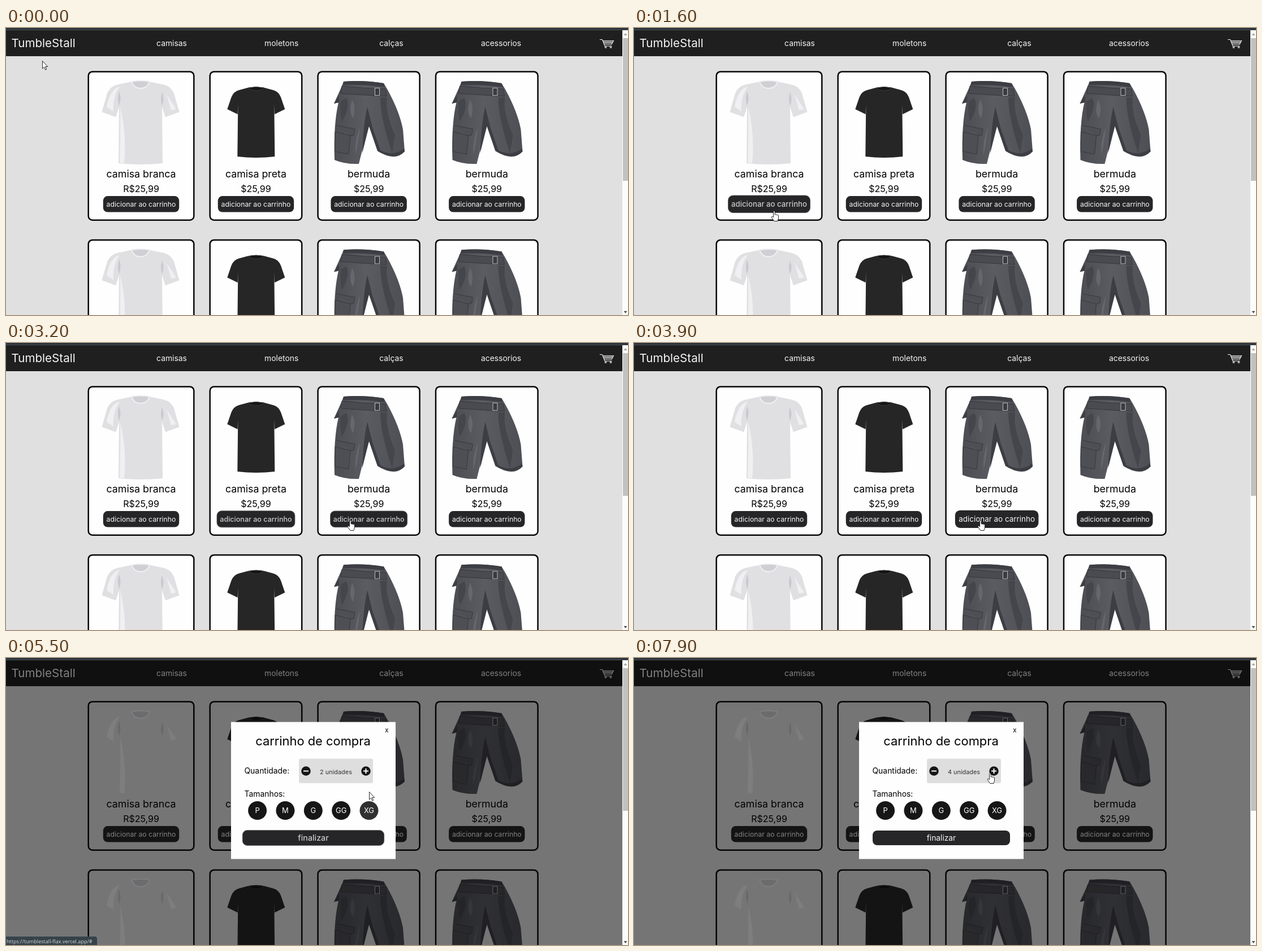
Animation, 1100 px wide and 509 px high, one loop 8 s. Source, as an HTML page:

```html
<!DOCTYPE html>
<html lang="pt">
<head>
<meta charset="utf-8">
<title>TumbleStall</title>
<style>
html, body { margin: 0; width: 100%; height: 100%; overflow: hidden; background: #e0e0e0; }
svg { display: block; width: 1100px; height: 509px; }
text { font-family: Inter, "Noto Sans", sans-serif; font-size: 13.9px; }
.mid { text-anchor: middle; }
.nav text { fill: #f4f4f4; }
.card { fill: #fefefe; stroke: #060606; stroke-width: 2.5; }
.dim .card { fill: #e0e0e0; }
.name { font-size: 17.8px; }
.price { font-size: 16px; }
.btn rect { fill: #262628; }
.btn text { font-size: 12.25px; fill: #f6f6f6; text-anchor: middle; }
.btn.busy rect { stroke: #5a5a5e; stroke-width: .8; }
.btn.busy text { fill: #c9c9c9; font-weight: 500; }
.btn.wide text { font-size: 13.8px; }
.sizes text { font-size: 13px; fill: #fff; text-anchor: middle; }
.link text { font-family: "Open Sans", "Noto Sans", sans-serif; font-size: 9.1px; fill: #d5dadd; }
</style>
</head>
<body>
<svg viewBox="0 0 1100 509">
  <defs>
    <linearGradient id="denim">
      <stop offset="0" stop-color="#4c4d53"/><stop offset=".45" stop-color="#5b5c62"/>
      <stop offset="1" stop-color="#4e4f55"/>
    </linearGradient>
    <g id="white">
      <path id="whiteCloth" fill="#e0e0e2"/>
      <path fill="#f0f0f3" d="M201 104Q184 108 178 140L190 148Q188 122 201 104ZM202 140Q214 190 209 240L201 239Q203 180 202 140ZM284 118l8 28 9-2Z"/>
      <path fill="#c9c9d0" d="M200 138Q205 124 200 112Q196 126 200 138ZM276 138Q272 126 276 114Q281 126 276 138Z"/>
      <path fill="#cfcfd4" stroke="#f0f0f2" stroke-width="2" d="M222 95Q238 92 254 95Q250 107 238 107Q226 107 222 95Z"/>
    </g>
    <g id="black">
      <path id="blackCloth" fill="#262626"/>
      <path fill="#151515" stroke="#3a3a3a" d="M429 106Q442 103 456 106Q451 111 442 111Q434 111 429 106Z"/>
    </g>
    <g id="shorts">
      <path fill="url(#denim)" d="M597 95Q632 92 668 98L674 108Q696 148 702 180L705 219Q688 238 657 218L642 174Q634 200 624 241Q600 242 581 234Q579 170 588 132L580 134L594 103Z"/>
      <path fill="#3d3e44" d="M597 95Q632 92 668 98L670 105Q632 100 596 101ZM580 134L589 120V132ZM642 174L630 222Q632 170 639 140L648 176L664 222L657 218ZM659 215Q682 230 704 214L705 219Q688 236 657 218Z"/>
      <path fill="#45464c" d="M674 123Q670 150 688 190L683 222Q662 160 662 123ZM602 124Q610 140 594 166Q590 150 592 130Z"/>
      <path fill="#66676d" d="M612 127Q620 140 614 160Q605 150 612 127ZM626 176Q623 205 618 226Q616 200 626 176Z"/>
      <path fill="#4a4b51" stroke="#36373c" d="M594 103Q632 107 671 108L673 121Q632 119 592 116Z"/>
      <path fill="#4e4f55" stroke="#38393e" d="M585 173L617 179L615 190L609 191L606 224L582 219V184L610 191"/>
      <rect x="652.500" y="106.500" width="8" height="13" fill="#3a3b40" stroke="#b9b9bd"/>
    </g>
  </defs>

  <rect width="1100" height="509" fill="#e0e0e0"/>
  <g id="shop"></g>
  <g class="nav">
    <rect y="4" width="1090" height="46" fill="#1f1f1f"/>
    <text x="9.500" y="34" style="font-size:20.600px">TumbleStall</text>
    <g id="menu" class="mid"></g>
    <g fill="none" stroke="#f0f0f0" stroke-width="1.100">
      <path d="M1050 20.500H1054.500L1059 32H1071.500M1055.500 22.500H1074.500L1071 29H1058M1056.500 24.600H1073M1057.500 26.700H1072"/>
      <circle cx="1060.500" cy="34" r="1.300"/><circle cx="1069.500" cy="34" r="1.300"/>
    </g>
  </g>

  <g id="modal">
    <rect y="4" width="1090" height="505" opacity=".48"/>
    <rect x="398" y="113.500" width="291" height="243" fill="#fefefe"/>
    <text class="mid" x="673.500" y="132" style="font-size:11.500px">x</text>
    <text class="mid" x="543" y="155" style="font-size:21.900px">carrinho de compra</text>
    <text x="421.500" y="204.500">Quantidade:</text>
    <rect x="518" y="178.500" width="131" height="43.500" rx="3" fill="#dedede"/>
    <g fill="#161616"><circle cx="530.500" cy="200.500" r="8.300"/><circle cx="636.500" cy="200.500" r="8.300"/></g>
    <path stroke="#fff" stroke-width="2" d="M526 200.500h9M632 200.500h9M636.500 196v9"/>
    <text id="count" class="mid" x="583.500" y="206" fill="#333" style="font-size:10.900px"></text>
    <text x="421.500" y="245.500">Tamanhos:</text>
    <g id="sizes" class="sizes"></g>
    <g id="finish" class="btn wide"><rect x="-121.500" y="-13" width="243" height="26" rx="8"/><text y="4.500">finalizar</text></g>
  </g>

  <rect width="1100" height="4" fill="#2a333a"/>
  <rect y="3" width="1100" height="1" fill="#49525a"/>
  <rect x="1090" y="4" width="10" height="505" fill="#fcfcfc"/>
  <rect x="1091" y="18" width="9" height="253" fill="#c1c1c1"/>
  <path fill="#a3a3a3" d="M1092.500 13h6l-3-4z"/>
  <path fill="#505050" d="M1092.500 502h6l-3 4z"/>

  <g id="link" class="link">
    <path fill="#35424a" d="M0 494H157Q161 494 161 498V509H0Z"/>
    <text x="1" y="505.500">https://tumblestall-flax.vercel.app/#</text>
  </g>
  <g id="pointer" fill="#fff" stroke="#151515" stroke-width=".9" stroke-linejoin="round">
    <path id="arrow" d="M.5 .5V14L3.600 11.200L5.700 16.200L7.700 15.300L5.600 10.500H9.700Z"/>
    <path id="hand" transform="translate(-4.500 0)" d="M4 11.500V1.900a1.300 1.300 0 0 1 2.600 0V7.200a1.200 1.200 0 0 1 2.200 .3a1.200 1.200 0 0 1 2.200 .5a1.100 1.100 0 0 1 2 .8V13.200L11.500 18.500H5.300L.8 12.200c-.8-1.400 .8-2.500 1.900-1.500z"/>
  </g>
</svg>
<script>
const $ = id => document.getElementById(id);
const STEP = 100, LOOP = 8000, GROW = 0.1, FADE = 1000;
const CARD_GAP = 28.4, ROW = 298.5, BUTTON_Y = 312.3, OPEN = 4600;

const cards = [
  { w: 186.6, art: "white", name: "camisa branca", price: "R$25,99" },
  { w: 162.5, art: "black", name: "camisa preta", price: "$25,99" },
  { w: 180, art: "shorts", name: "bermuda", price: "$25,99" },
  { w: 180.6, art: "shorts", name: "bermuda", price: "$25,99", shift: 208.5 }
];
let left = 145.7;
for (const c of cards) {
  c.x = left;
  c.mid = left + c.w / 2;
  left += c.w + CARD_GAP;
}

// right half of a shirt, then the same points mirrored
function shirt(cx, top, body, arm, drop, h) {
  const half = [[15, 2], [.6 * arm, .05 * h], [.78 * arm, .07 * h], [.86 * arm, .15 * h],
    [arm, drop], [.64 * arm, drop + 9], [body, drop - 9], [body + 1, h - 2]];
  const at = (p, side) => `${cx + side * p[0]} ${top + p[1]} `;
  const r = half.map(p => at(p, 1)), l = half.map(p => at(p, -1)).reverse();
  return `M${r[0]}L${r[1]}Q${r[2]}${r[3]}L${r.slice(4).join("")}Q${cx} ${top + h + 2} ${l[0]}`
    + `L${l.slice(1, 5).join("")}Q${l[5]}${l[6]}L${l[7]}Q${cx} ${top - 1} ${r[0]}Z`;
}
$("whiteCloth").setAttribute("d", shirt(238, 93, 38, 68.5, 56, 149));
$("blackCloth").setAttribute("d", shirt(442.3, 104, 32, 51, 40, 126));

const cardMarkup = (c, row) => `<g transform="translate(0 ${row * ROW})">
  <rect class="card" x="${c.x}" y="77.4" width="${c.w}" height="263.4" rx="7.2"/>
  <use href="#${c.art}" x="${c.shift || 0}"/>
  <text class="mid name" x="${c.mid}" y="265">${c.name}</text>
  <text class="mid price" x="${c.mid}" y="291">${c.price}</text></g>`;

const buttonMarkup = (_, i) => `<g id="add${i}" class="btn">
  <rect x="-67.2" y="-14.2" width="134.4" height="28.4" rx="8"/><text y="4.2">adicionar ao carrinho</text></g>`;

$("shop").innerHTML = [0, 1].map(row => cards.map(c => cardMarkup(c, row)).join("")).join("")
  + cards.map(buttonMarkup).join("");

$("menu").innerHTML = ["camisas", "moletons", "calças", "acessorios"]
  .map((s, i) => `<text x="${293 + i * 194.2}" y="31.5">${s}</text>`).join("");

$("sizes").innerHTML = ["P", "M", "G", "GG", "XG"].map((s, i) => {
  const x = 444.6 + i * 49.35;
  return `<circle id="size${s}" cx="${x}" cy="270.5" r="16.5" fill="#161616"/><text x="${x}" y="275">${s}</text>`;
}).join("");

// key points of the pointer: time, x, y
const path = [
  [0, 64, 58], [100, 44, 165], [200, 44, 165], [400, 21, 200], [700, 217, 226], [900, 217, 226],
  [1300, 247, 325], [1600, 247, 324], [2300, 442, 313], [2700, 512, 313], [3200, 608, 314],
  [3900, 612, 314], [4700, 612, 314], [5100, 642, 300], [5500, 642, 237], [6000, 638, 206],
  [7800, 638, 206], [7900, 629, 204]
];

function pointer(t) {
  const i = path.findLastIndex(p => p[0] <= t), a = path[i], b = path[i + 1] || a;
  const k = (t - a[0]) / (b[0] - a[0] || 1);
  return [a[1] + (b[1] - a[1]) * k, a[2] + (b[2] - a[2]) * k];
}

const near = (x, y, cx, cy, w, h) => Math.abs(x - cx) < w && Math.abs(y - cy) < h;

function overControl(x, y, open) {
  if (!open) return cards.some(c => near(x, y, c.mid, BUTTON_Y, 70, 15));
  return near(x, y, 543.5, 319, 126, 14) || near(x, y, 642, 270.5, 16, 16) || near(x, y, 636.5, 200.5, 9, 9);
}

// same curve as CSS "ease"
function ease(p) {
  if (p <= 0) return 0;
  if (p >= 1) return 1;
  const bez = (u, a, b) => 3 * u * (1 - u) * ((1 - u) * a + u * b) + u ** 3;
  let lo = 0, hi = 1;
  for (let n = 0; n < 24; n++) {
    const u = (lo + hi) / 2;
    if (bez(u, 0.25, 0.25) < p) lo = u; else hi = u;
  }
  return bez(lo, 0.1, 1);
}

function hover(t, from, to, time = FADE) {
  if (t < to) return ease((t - from) / time);
  const top = ease((to - from) / time);
  return top * (1 - ease((t - to) / (time * top)));
}

function setButton(id, x, y, v) {
  $(id).setAttribute("transform", `translate(${x} ${y}) scale(${1 + GROW * v})`);
  $(id).classList.toggle("busy", v > 0.005 && v < 0.97);
}

const show = (id, on) => $(id).style.display = on ? "" : "none";
const visits = [[1110, 1950], [2060, 2790], [3080, 4560]];

function draw(time) {
  const t = Math.floor(time % LOOP / STEP) * STEP, open = t >= OPEN;

  cards.forEach((c, i) => setButton("add" + i, c.mid, BUTTON_Y, visits[i] ? hover(t, ...visits[i]) : 0));
  setButton("finish", 543.5, 319, hover(t, 4520, 5150));

  show("modal", open);
  $("shop").classList.toggle("dim", open);
  show("link", t >= 5300 && t < 5900);
  $("count").textContent = 2 + (t >= 6900) + (t >= 7600) + " unidades";
  const tint = 22 + 38 * hover(t, 5150, 5430, 400);
  $("sizeXG").setAttribute("fill", `rgb(${tint},${tint},${tint})`);

  const [x, y] = pointer(t), hand = overControl(x, y, open);
  show("hand", hand);
  show("arrow", !hand);
  $("pointer").setAttribute("transform", `translate(${x} ${y})`);
}

function tick(now) {
  draw(now);
  requestAnimationFrame(tick);
}
draw(0);
requestAnimationFrame(tick);
</script>
</body>
</html>
```
